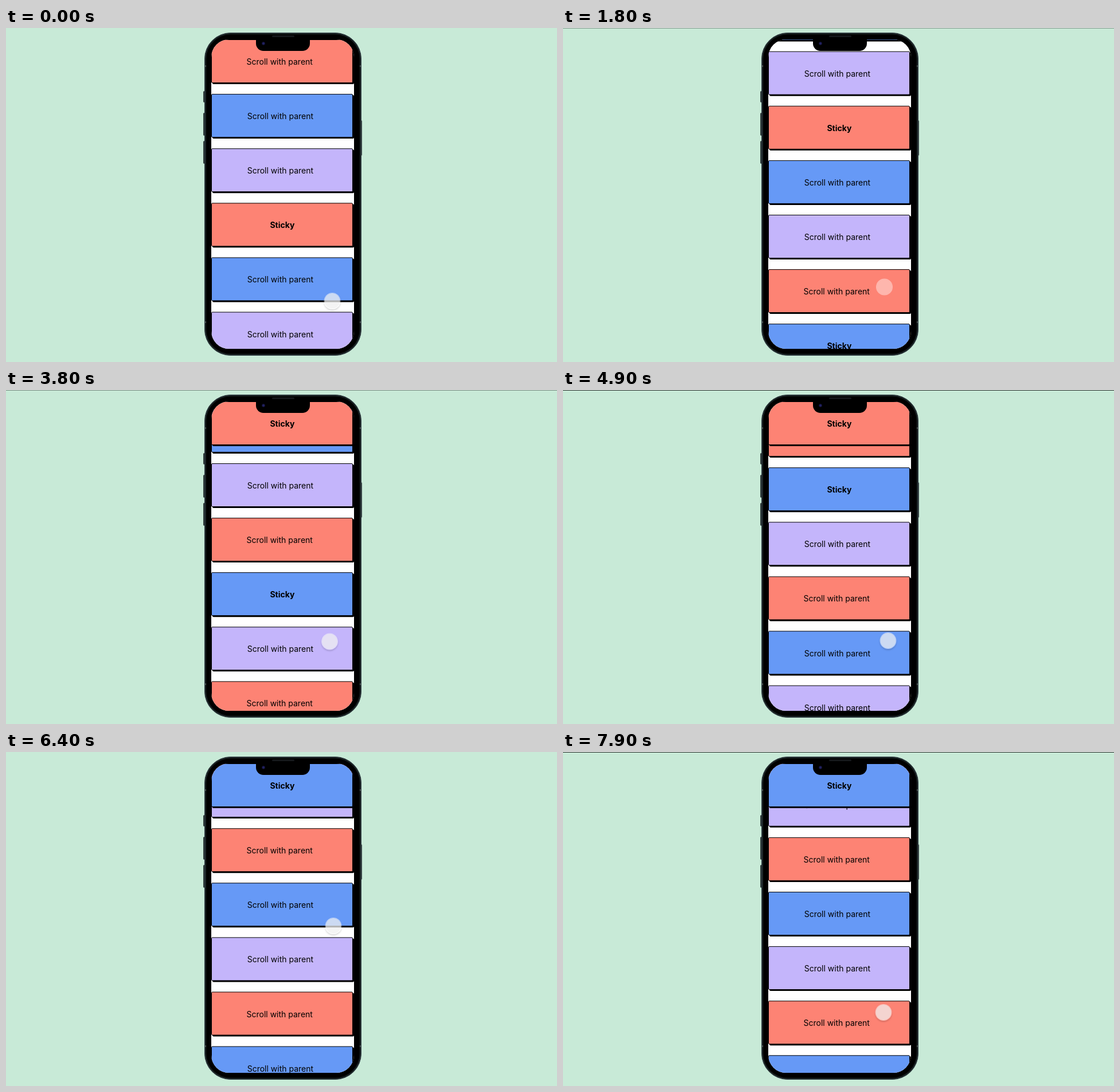
An HTML page that plays this animation: 961x583 px, repeating every 8 s.

```html
<!DOCTYPE html>
<html lang="en">
<head>
<meta charset="utf-8">
<title>Sticky scroll</title>
<style>
  html, body { margin: 0; width: 100%; height: 100%; overflow: hidden; background: #c8ead7; }
  body { position: relative; font: 14px/20px Inter, sans-serif; color: #000; }
  div { position: absolute; box-sizing: border-box; }

  #edge {
    left: 0; top: 0; width: 100%; height: 1px; background: #2b312e;
    animation: edge 8s step-end infinite;
  }
  @keyframes edge {
    0%, 75% { opacity: 0; }
    18.75% { opacity: .42; }
    27.5%, 52.5%, 83.75% { opacity: 1; }
    46.25% { opacity: .5; }
  }

  .button {
    left: 344px; width: 4px; height: 40px; border-radius: 1.5px;
    background: #1d2726; border: 1px solid #3a4745;
  }
  .power { left: 617px; top: 161px; height: 62px; }
  #phone {
    left: 346px; top: 8px; width: 274px; height: 564px; border-radius: 46px;
    background: #000; border: 1px solid #37434a;
    box-shadow: inset 0 0 0 1.5px #1e2829, inset 0 0 0 2.5px #0c1011;
  }
  .band { left: 347px; width: 272px; height: 3px; border: solid #4b5654; border-width: 0 2px; }
  #screen {
    left: 358px; top: 20px; width: 249px; height: 540px; border-radius: 31px;
    background: #fff; overflow: hidden; isolation: isolate;
  }
  .card {
    left: 0; top: 0; width: 247px; height: 76px; border: 1px solid #000; border-radius: 2px;
    box-shadow: 2px 2px 0 #000; text-align: center; line-height: 74px; white-space: nowrap;
  }
  .card span { position: relative; top: .8px; left: -3.1px; }
  .card:nth-child(3n + 1) span { left: -4.3px; }
  .card.sticky { z-index: 1; font-weight: 700; }
  .card.sticky span { left: .4px; }
  #notch { left: 436px; top: 18px; width: 94px; height: 22px; border-radius: 0 0 13px 13px; background: #000; }
  #speaker { left: 464px; top: 13px; width: 39px; height: 3px; border-radius: 2px; background: #15181b; }
  #lens {
    left: 446px; top: 24px; width: 6px; height: 6px; border-radius: 50%;
    background: radial-gradient(#252568 20%, #0c0c28 70%);
  }
  #cursor {
    left: -14.5px; top: -14.5px; width: 29px; height: 29px; border-radius: 50%;
    border: 1px solid rgba(255, 255, 255, .45);
    background: rgba(240, 240, 240, .74); background-clip: padding-box;
    box-shadow: 0 2px 3px rgba(0, 0, 0, .16);
  }
  #cursor.pressed { background-color: rgba(255, 255, 255, .41); box-shadow: none; }
</style>
</head>
<body>
<div id="edge"></div>
<div class="button" style="top:110px;height:20px"></div>
<div class="button" style="top:148px"></div>
<div class="button" style="top:197px"></div>
<div class="button power"></div>
<div id="phone"></div>
<div class="band" style="top:65px"></div>
<div class="band" style="top:512px"></div>
<div id="screen"></div>
<div id="notch"></div>
<div id="speaker"></div>
<div id="lens"></div>
<div id="cursor"></div>

<script>
const LOOP = 8000, STEP = 100, PITCH = 95.1;
const GLIDE_TIME = 500;  // momentum after the finger lifts
const SETTLE = 100;      // the cursor waits this long before pressing
const LEAN = .07;        // sideways drift of the thumb per pixel dragged
const COLORS = ['#fd8374', '#6699f6', '#c4b5fb'];
const STICKY = [3, 7];

// Each swipe drags the page from (x, y), then lets it glide on.
const SWIPES = [
  { press: 300, lift: 1000, x: 568.5, y: 476, drag: 146, glide: 23.5 },
  { press: 1800, lift: 2700, x: 560, y: 451.5, drag: 142, glide: 56 },
  { press: 3900, lift: 4400, x: 564, y: 438.5, drag: 148, glide: 35 },
  { press: 5000, lift: 5900, x: 566.5, y: 437, drag: 134, glide: 58.2 },
  { press: 6500, lift: 6700, x: 570.5, y: 303, drag: -15.7, glide: 0 }
];
const REST = { press: LOOP, x: 558.5, y: 454 };

const screenEl = document.getElementById('screen');
const cursor = document.getElementById('cursor');

const progress = (t, from, to) => Math.min(1, Math.max(0, (t - from) / (to - from)));
const smooth = p => p * p * (3 - 2 * p);
const coast = p => 1 - (1 - p) ** 3;
const mix = (a, b, p) => a + (b - a) * p;

const cards = Array.from({ length: 15 }, (_, i) => {
  const el = document.createElement('div');
  const label = document.createElement('span');
  const sticky = STICKY.includes(i);
  el.className = sticky ? 'card sticky' : 'card';
  el.style.background = COLORS[i % COLORS.length];
  label.textContent = sticky ? 'Sticky' : 'Scroll with parent';
  el.append(label);
  screenEl.append(el);
  return { el, sticky, y: i * PITCH };
});

function scrollAt(t) {
  return SWIPES.reduce((sum, s) => sum
    + s.drag * progress(t, s.press, s.lift)
    + s.glide * coast(progress(t, s.lift, s.lift + GLIDE_TIME)), 0);
}

function cursorAt(t) {
  const n = Math.max(0, SWIPES.findLastIndex(s => s.press <= t));
  const s = SWIPES[n], next = SWIPES[n + 1] || REST;
  const moved = s.drag * progress(t, s.press, s.lift);
  const back = smooth(progress(t, s.lift, next.press - SETTLE));
  return {
    x: mix(s.x + moved * LEAN, next.x, back),
    y: mix(s.y - moved, next.y, back),
    pressed: t >= s.press && t < s.lift
  };
}

function draw(t) {
  const scroll = scrollAt(t);
  for (const { el, sticky, y } of cards) {
    const top = sticky ? Math.max(0, y - scroll) : y - scroll;
    el.style.transform = `translateY(${top}px)`;
  }
  const { x, y, pressed } = cursorAt(t);
  cursor.style.transform = `translate(${x}px, ${y}px)`;
  cursor.classList.toggle('pressed', pressed);
}

const start = performance.now();
function tick() {
  const t = (performance.now() - start) % LOOP;
  draw(Math.floor(t / STEP) * STEP);
  requestAnimationFrame(tick);
}
tick();
</script>
</body>
</html>
```
